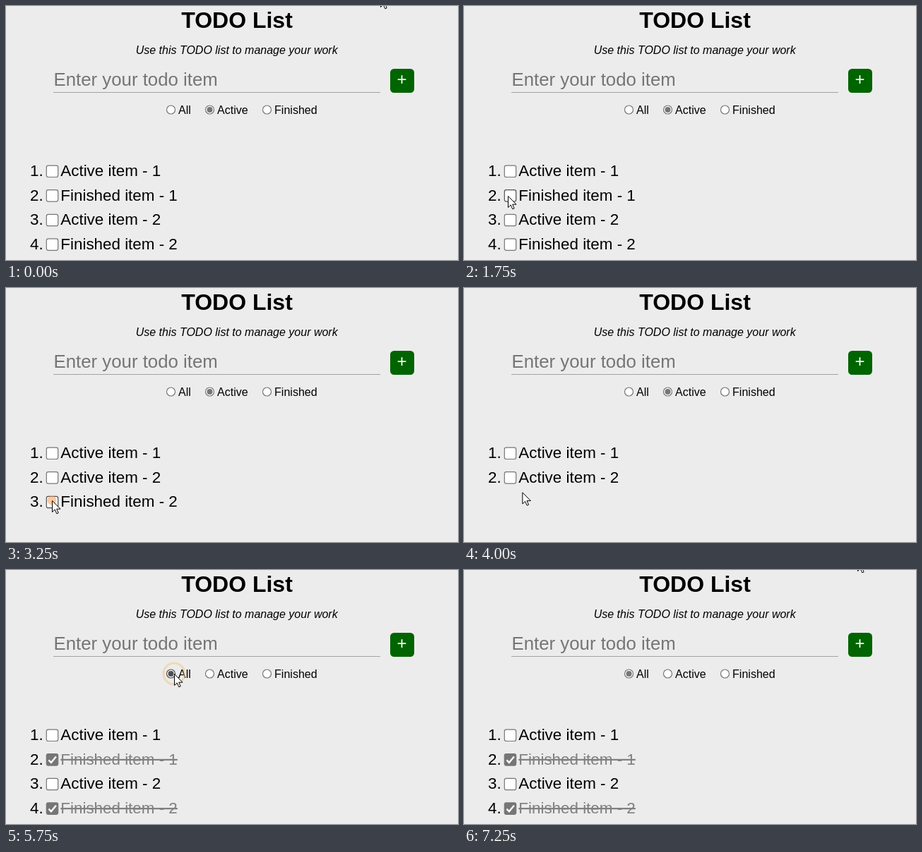
Recreate the animation shown at these times as an HTML page. Size 640 by 360 pixels, loop 7500 ms.

```html
<!DOCTYPE html>
<html lang="en">
<head>
<meta charset="utf-8">
<title>TODO List</title>
<style>
  html, body { margin: 0; width: 100%; height: 100%; overflow: hidden; background: #ececec; }
  svg { display: block; width: 640px; height: 360px; font: 16px "Liberation Sans", Arial, sans-serif; }
  .item { font-size: 22.4px; }
  .done { fill: #808080; text-decoration: line-through; }
  .box, .radio { fill: #fff; stroke: #767676; stroke-width: 1.2; }
  .hover { stroke: #4f4f4f; }
  .dot { fill: #767676; }
  .hover + .dot { fill: #4f4f4f; }
</style>
</head>
<body>
<svg viewBox="0 0 640 360">
  <text x="327" y="31" text-anchor="middle" font-size="32" font-weight="bold">TODO List</text>
  <text x="326.7" y="68" text-anchor="middle" font-style="italic">Use this TODO list to manage your work</text>
  <text x="67.5" y="113" font-size="25.8" fill="#757575">Enter your todo item</text>
  <path d="M67 122.5H530" stroke="#a3a3a3"/>
  <rect x="544" y="89" width="34" height="34" rx="5.5" fill="#006400"/>
  <text x="560.5" y="112" text-anchor="middle" font-size="24" fill="#fff">+</text>
  <g id="filters"></g>
  <g id="list"></g>
  <circle id="click"/>
  <path id="cursor" d="M.5 .5V16.6L4.2 13L6.8 18.8L9.2 17.8L6.7 12.2H12Z" fill="#fff" stroke="#000"/>
</svg>
<script>
const LOOP = 7500, STEP = 250;
const $ = id => document.getElementById(id);

const tasks = ["Active item - 1", "Finished item - 1", "Active item - 2", "Finished item - 2"];
const filters = [["All", 233.5], ["Active", 288.5], ["Finished", 369.5]];

// time, x, y of the pointer tip
const path = [
  [250, 530, -15], [1750, 62, 269], [2250, 62, 269], [3000, 65, 301], [3750, 65, 301],
  [5000, 232, 189], [5500, 238, 147], [6250, 238, 147], [7250, 557, -15]
];
// time, expanding ring (or pressed dot)
const clicks = [[2000, true], [3250, false], [3500, true], [5500, false], [5750, true]];

function pointerAt(t) {
  if (t <= path[0][0]) return path[0].slice(1);
  const i = path.findIndex(key => key[0] >= t);
  if (i < 0) return path.at(-1).slice(1);
  const [t0, x0, y0] = path[i - 1], [t1, x1, y1] = path[i];
  const u = (t - t0) / (t1 - t0), e = u * u * (3 - 2 * u);
  return [x0 + (x1 - x0) * e, y0 + (y1 - y0) * e];
}

function drawFilters(chosen, near) {
  return filters.map(([name, x]) =>
    `<circle class="radio${near(x, 147, 7)}" cx="${x}" cy="147" r="6"/>` +
    (name === chosen ? `<circle class="dot" cx="${x}" cy="147" r="4"/>` : "") +
    `<text x="${x + 10.6}" y="153">${name}</text>`).join("");
}

function drawItem({ name, done }, i, near) {
  const y = 234.3 + i * 34.6;
  const box = `<rect class="box${near(65.5, y, 9)}" x="57.3" y="${y - 8.2}" width="16.4" height="16.4" rx="2.5"` +
    (done ? ' style="fill:#767676"/>' : "/>");
  const tick = done ? `<path d="M60.5 ${y + .5}l3.4 3.6l7-8.4" fill="none" stroke="#fff" stroke-width="2.4"/>` : "";
  return `<g class="item"><text x="34" y="${y + 6.7}">${i + 1}.</text>${box}${tick}` +
    `<text class="${done ? "done" : ""}" x="77.3" y="${y + 6.7}">${name}</text></g>`;
}

function render(t) {
  const [x, y] = pointerAt(t);
  const near = (cx, cy, r) => Math.abs(x - cx) < r && Math.abs(y - cy) < r ? " hover" : "";
  const showAll = t >= 5750;
  const finished = [false, t >= 2000, false, t >= 3500];
  const items = tasks.map((name, i) => ({ name, done: finished[i] })).filter(item => showAll || !item.done);

  $("filters").innerHTML = drawFilters(showAll ? "All" : "Active", near);
  $("list").innerHTML = items.map((item, i) => drawItem(item, i, near)).join("");
  $("cursor").setAttribute("transform", `translate(${x} ${y})`);

  const click = clicks.find(c => c[0] === t);
  const look = !click ? "display:none"
    : click[1] ? "fill:none;stroke:#f3c88c;stroke-width:3;opacity:.55"
    : "fill:#ff9b55;opacity:.55";
  const attrs = { cx: x, cy: y, r: click && click[1] ? 15 : 6.5, style: look };
  for (const name in attrs) $("click").setAttribute(name, attrs[name]);
}

const start = performance.now();
let last = -1;
function tick() {
  const t = Math.floor((performance.now() - start) % LOOP / STEP) * STEP;
  if (t !== last) render(last = t);
  requestAnimationFrame(tick);
}
tick();
</script>
</body>
</html>
```
